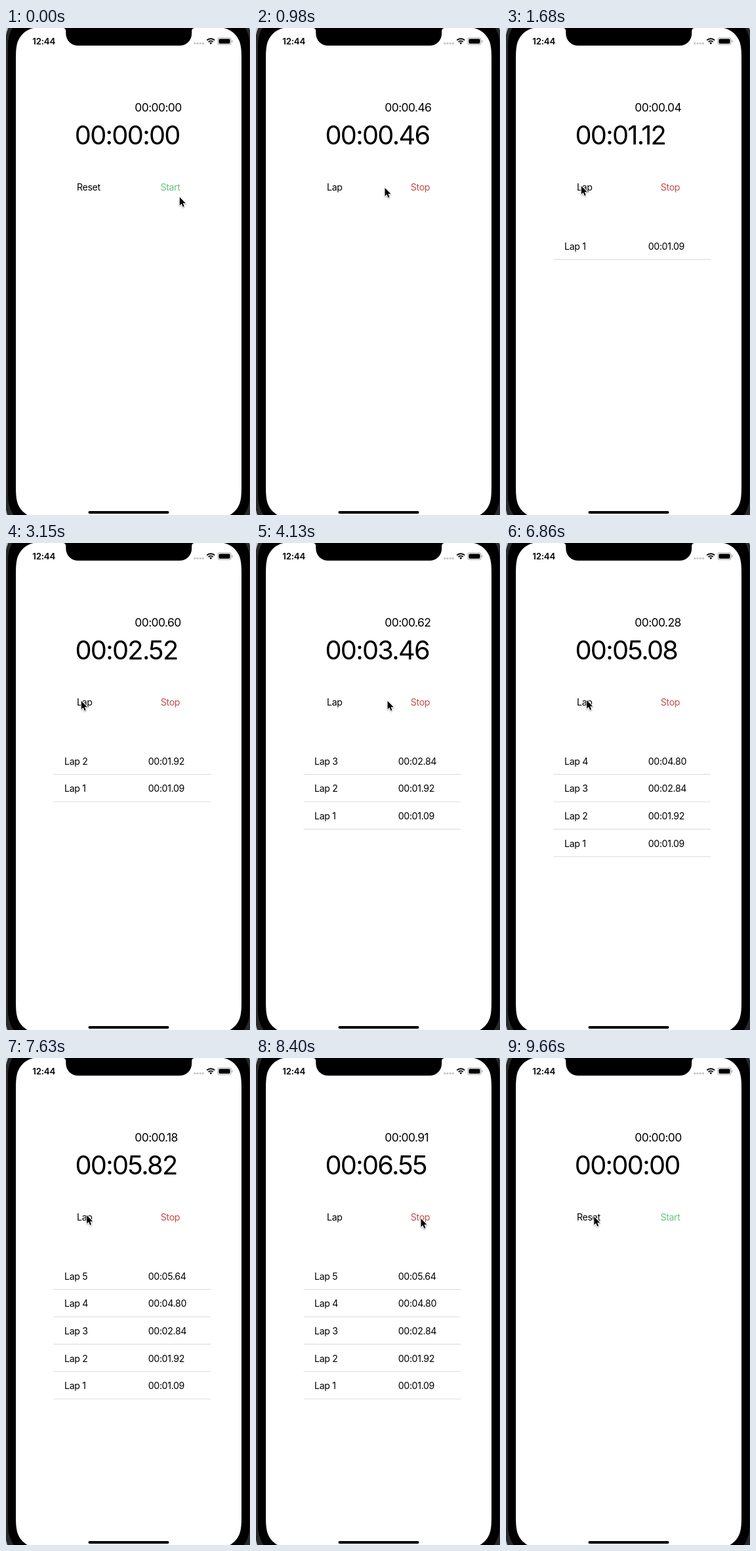
Write an HTML page with a canvas that moves like this. It is 372x740 px and loops after 9800 ms.

```html
<!DOCTYPE html>
<html lang="en">
<head>
<meta charset="utf-8">
<title>Stopwatch</title>
<style>
html, body { margin: 0; width: 100%; height: 100%; overflow: hidden; background: #fff; }
canvas { display: block; width: 372px; height: 740px; }
</style>
</head>
<body>
<canvas id="stage"></canvas>
<script>
const W = 372, H = 740, STEP = 70, LOOP = 9800;
const canvas = document.getElementById('stage');
const ctx = canvas.getContext('2d');
const dpr = window.devicePixelRatio || 1;
canvas.width = W * dpr;
canvas.height = H * dpr;

const GREEN = '#63c67c', RED = '#c54b48';
const TICK = 1 / 15;

// All moments below are counted in steps of 70 ms.
const START = 8, STOP = 67, RESUME = 82, END = 124, RESET = 138;
const LAPS = [[24, 1.086], [36, 1.92], [50, 2.84], [94, 4.8], [107, 5.64]];
const LEFT_TAPS = [...LAPS.map(lap => lap[0]), RESET];
const RIGHT_TAPS = [START, STOP, RESUME, END];

// step, x, y, downward bow on the way there
const PATH = [
  [0, 264.8, 257, 0], [5, 255, 245, 0], [10, 255, 245, 0], [19, 114.8, 240, 0],
  [54, 114.8, 240, 0], [63, 262, 240, 0], [69, 262, 240, 0], [72, 261.3, 244, 0],
  [83, 261.3, 244, 0], [91, 123.2, 239, 0], [110, 123.2, 239, 0],
  [119, 251.5, 244, 0], [124, 251.5, 245, 0], [134, 134.3, 241, 10], [140, 134.3, 241, 0]
];

function pointer(n) {
  const i = PATH.findIndex(p => p[0] > n);
  const a = PATH[i - 1], b = PATH[i];
  const k = (n - a[0]) / (b[0] - a[0]);
  const e = k * k * (3 - 2 * k);
  return [a[1] + (b[1] - a[1]) * e,
          a[2] + (b[2] - a[2]) * e + b[3] * Math.sin(Math.PI * e)];
}

function elapsed(n) {
  if (n < STOP) return (n - 7.14) * TICK;
  if (n < RESUME) return 3.96;
  return n < END ? 3.96 + (n - 81.14) * TICK : 6.79;
}

const clock = s => '00:' + s.toFixed(2).padStart(5, '0');
const pressed = (n, taps) => taps.some(tap => n === tap - 1 || n === tap - 2);

function text(str, x, y, size, { color = '#000', weight = 400, track = -0.025, align = 'left', alpha = 1 } = {}) {
  ctx.save();
  ctx.globalAlpha = alpha;
  ctx.font = `${weight} ${size}px Inter, Roboto, sans-serif`;
  ctx.letterSpacing = size * track + 'px';
  ctx.textAlign = align;
  ctx.fillStyle = color;
  ctx.fillText(str, x, y);
  ctx.restore();
}

function box(x, y, w, h, r, color) {
  ctx.beginPath();
  ctx.roundRect(x, y, w, h, r);
  ctx.fillStyle = color;
  ctx.fill();
}

// Rectangle whose corners ease gradually into the sides.
function smoothBox(x, y, w, h, r, color) {
  const cx = x + w / 2, cy = y + h / 2;
  ctx.fillStyle = color;
  ctx.beginPath();
  for (let i = 0; i < 4; i++) {
    const turn = i * Math.PI / 2, c = Math.round(Math.cos(turn)), s = Math.round(Math.sin(turn));
    const a = i % 2 ? h / 2 : w / 2, b = i % 2 ? w / 2 : h / 2;
    const at = (u, v) => {
      const px = a - u * r, py = v * r - b;
      return [cx + px * c - py * s, cy + px * s + py * c];
    };
    ctx.lineTo(...at(1.528, 0));
    ctx.bezierCurveTo(...at(1.088, 0), ...at(0.868, 0), ...at(0.631, 0.075));
    ctx.bezierCurveTo(...at(0.373, 0.169), ...at(0.169, 0.373), ...at(0.075, 0.631));
    ctx.bezierCurveTo(...at(0, 0.868), ...at(0, 1.088), ...at(0, 1.528));
  }
  ctx.fill();
}

function drawPhone() {
  box(0, 0, W, H, 0, '#c8c8c8');
  box(-1, -32, 376, 807, 53, '#28292b');
  box(3, -25, 368.5, 787, 50, '#000');
  smoothBox(15, -1.5, 344, 746.5, 36, '#fff');
  ctx.beginPath();
  ctx.moveTo(86.5, -2);
  ctx.lineTo(86.5, 0);
  ctx.quadraticCurveTo(91.3, 0, 91.3, 5);
  ctx.arcTo(91.3, 26.8, 110, 26.8, 18.5);
  ctx.arcTo(283.2, 26.8, 283.2, 5, 18.5);
  ctx.lineTo(283.2, 5);
  ctx.quadraticCurveTo(283.2, 0, 288, 0);
  ctx.lineTo(288, -2);
  ctx.fillStyle = '#000';
  ctx.fill();
  box(125.5, 733.9, 123, 4, 2, '#000');
}

function drawStatus() {
  text('12:44', 40.2, 25, 13.3, { weight: 600, track: -0.012 });
  for (let i = 0; i < 4; i++) box(286.2 + i * 4.2, 22, 3.2, 3, 1.4, '#c3c3c7');

  ctx.strokeStyle = '#000';
  ctx.lineWidth = 1.9;
  for (const r of [5, 8.4]) {
    ctx.beginPath();
    ctx.arc(312.2, 24.6, r, -Math.PI * 0.75, -Math.PI * 0.25);
    ctx.stroke();
  }
  ctx.beginPath();
  ctx.moveTo(312.2, 25);
  ctx.arc(312.2, 24.6, 2.8, -Math.PI * 0.75, -Math.PI * 0.25);
  ctx.fillStyle = '#000';
  ctx.fill();

  box(322.5, 14.5, 21, 11.2, 3.2, '#aaa');
  box(323.4, 15.4, 19.2, 9.4, 2.5, '#fff');
  box(324.4, 16.4, 17.2, 7.4, 1.7, '#000');
  box(344.1, 18.2, 1.3, 3.8, 0.7, '#aaa');
}

function drawWatch(n) {
  const fresh = n < START || n >= RESET;
  const running = !fresh && (n < STOP || (n >= RESUME && n < END));
  const laps = fresh ? [] : LAPS.filter(lap => lap[0] <= n);
  const total = elapsed(n);
  const last = laps.length ? laps[laps.length - 1][1] : 0;
  const zero = '00:00:00';

  text(fresh ? zero : clock(total - last), 196.3, 126.5, 17.5, { track: -0.035 });
  text(fresh ? zero : clock(total), fresh ? 104.8 : 105.4, 177.2, 39.8, { track: -0.043 });

  text(running ? 'Lap' : 'Reset', 108, 247, 14.2,
    { alpha: pressed(n, LEFT_TAPS) ? 0.45 : 1 });
  text(running ? 'Stop' : 'Start', 250.5, 247, 14.2,
    { color: running ? RED : GREEN, align: 'center', alpha: pressed(n, RIGHT_TAPS) ? 0.5 : 1 });

  laps.slice().reverse().forEach((lap, i) => {
    const y = 336.7 + i * 41.6;
    text('Lap ' + (laps.length - i), 89, y, 14.2);
    text(clock(lap[1]), 216.7, y, 14.2);
    box(72.5, y + 14.4, 239.5, 1.1, 0, '#dedee0');
  });
}

function drawPointer(n) {
  const [x, y] = pointer(n);
  if (pressed(n, LEFT_TAPS) || pressed(n, RIGHT_TAPS)) {
    ctx.beginPath();
    ctx.arc(x - 1.2, y - 0.5, 21.3, 0, Math.PI * 2);
    ctx.strokeStyle = '#000';
    ctx.lineWidth = 1.5;
    ctx.stroke();
  }
  ctx.save();
  ctx.translate(x, y);
  ctx.beginPath();
  [[0, 0], [0, 12.6], [2.9, 9.9], [4.9, 14.8], [6.9, 13.9], [4.9, 9.2], [9, 9.2]]
    .forEach(p => ctx.lineTo(...p));
  ctx.closePath();
  ctx.lineJoin = 'round';
  ctx.strokeStyle = '#fff';
  ctx.lineWidth = 1.8;
  ctx.shadowColor = 'rgba(0,0,0,0.35)';
  ctx.shadowBlur = 2 * dpr;
  ctx.shadowOffsetY = dpr;
  ctx.stroke();
  ctx.shadowColor = 'transparent';
  ctx.fillStyle = '#000';
  ctx.fill();
  ctx.restore();
}

const begin = performance.now();

function frame() {
  const t = (performance.now() - begin) % LOOP;
  const n = Math.floor(t / STEP);
  ctx.setTransform(dpr, 0, 0, dpr, 0, 0);
  drawPhone();
  drawStatus();
  drawWatch(n);
  drawPointer(n);
  requestAnimationFrame(frame);
}
frame();
</script>
</body>
</html>
```
